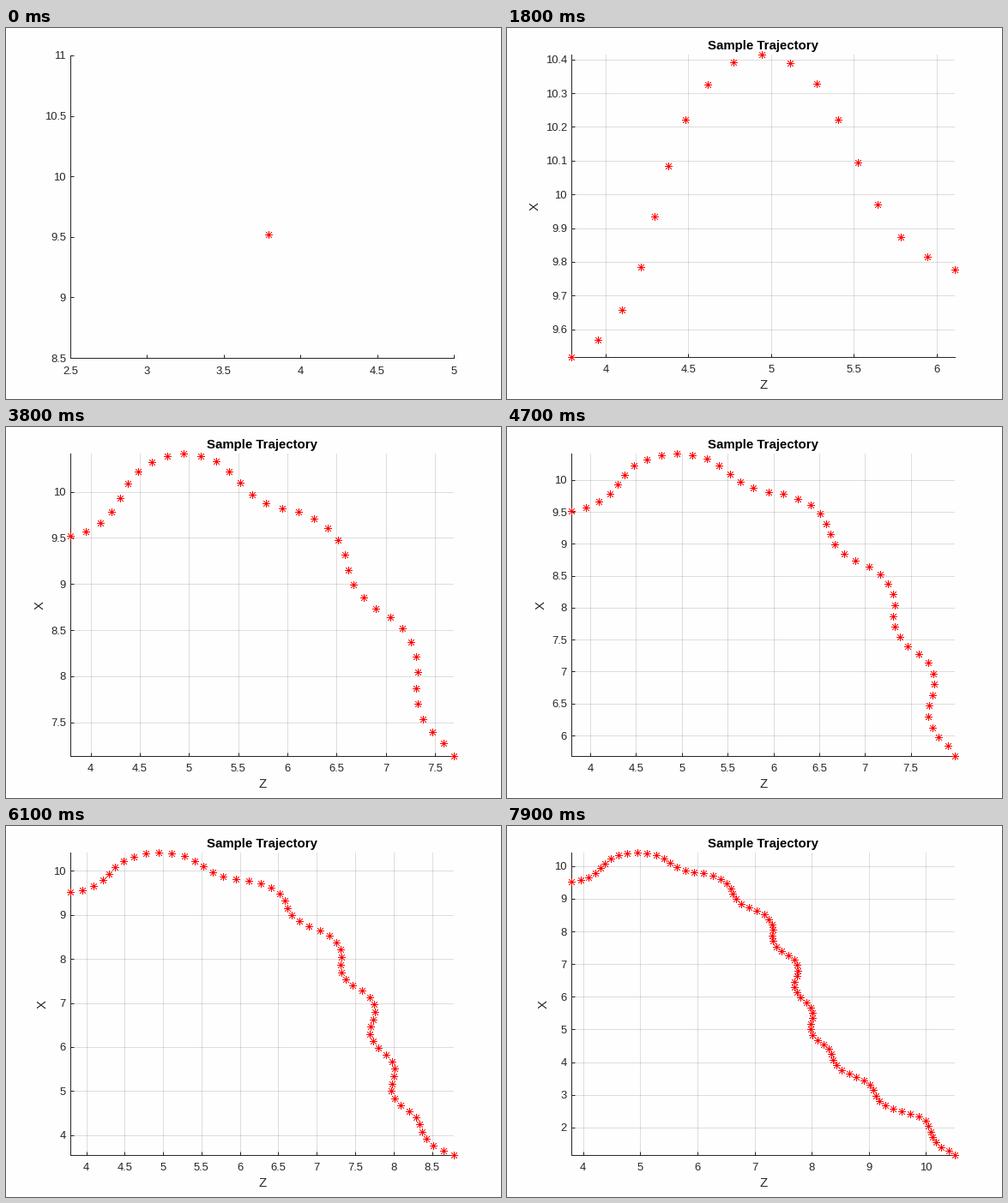
Recreate the animation shown at these times as a matplotlib script. Size 577 px wide and 433 px high, loop 8000 ms.

```python
import math

import matplotlib.pyplot as plt
import numpy as np
from matplotlib.animation import FuncAnimation
from matplotlib.markers import MarkerStyle

W, H = 577, 433
FRAMES, INTERVAL = 80, 100
PAUSE = 23                      # this frame adds no sample
LEFT, RIGHT = 75, 522           # plot box in pixels
INK = (0.15, 0.15, 0.15)
TICK_SIZE, LABEL_SIZE = 13, 15

# The path moves at constant speed; only its heading (degrees) varies.
START = 3.7933 + 9.518j
STEP = 0.1712
HEADINGS = [
    17.5, 32, 47.5, 60, 62.5, 52.5, 37.5, 22.5, 8, -8.5, -21,
    -38.5, -48, -46, -34.5, -20, -12.5, -23.5, -36, -51.5, -67,
    -76.5, -72, -54.5, -43, -32, -44.5, -59.5, -71.5, -84.5, -95,
    -85, -71.5, -57, -45, -54, -72.5, -85.5, -97.5, -102, -92,
    -76, -65, -54, -64.5, -78.5, -93.5, -99, -91, -76, -62,
    -51.5, -56.5, -75, -80, -71, -57.5, -40, -38.5, -40, -52.5,
    -69, -77, -68.5, -50, -40, -28, -25.5, -31, -50, -70.5,
    -78.5, -79, -69, -55.5, -44, -49,
]


def make_path():
    moves = STEP * np.exp(1j * np.radians(HEADINGS))
    moves[0] *= 0.972           # slightly slower start
    path = START + np.concatenate(([0], np.cumsum(moves)))
    return path.real, path.imag


def tick_step(span):
    return next(m * 10.0 ** e for e in range(-4, 3) for m in (1, 2, 5)
                if span / (m * 10.0 ** e) <= 11)


def make_ticks(lo, hi):
    step = tick_step(hi - lo)
    first = math.ceil(lo / step - 1e-6)
    last = math.floor(hi / step + 1e-6)
    values = np.arange(first, last + 1) * step
    return values, [f"{round(v, 6):g}" for v in values]


def tight(values):
    lo, hi = values.min(), values.max()
    return (lo, hi) if hi > lo else (lo - 1, hi + 1)


def text_width(label):
    dots = label.count(".")
    return TICK_SIZE * (0.556 * (len(label) - dots) + 0.278 * dots)


def set_box(top, bottom):
    ax.set_position([LEFT / W, 1 - bottom / H,
                     (RIGHT - LEFT) / W, (bottom - top) / H])


def put_text(x, y, text, **style):
    return fig.text(x / W, 1 - y / H, text, ha="center", va="baseline",
                    fontsize=LABEL_SIZE, **style)


plt.rcParams["font.family"] = "Liberation Sans"
fig = plt.figure(figsize=(W / 72, H / 72), dpi=72, facecolor="#fefefe")
ax = fig.add_axes([0, 0, 1, 1], facecolor="none")
ax.set_axisbelow(True)
for side in ("top", "right"):
    ax.spines[side].set_visible(False)
for side in ("left", "bottom"):
    ax.spines[side].set(linewidth=1, color=INK)
ax.tick_params(direction="in", length=4, width=1, color=INK,
               labelcolor=INK, labelsize=TICK_SIZE)
ax.tick_params(axis="x", pad=9.5)
ax.tick_params(axis="y", pad=5)

xs, ys = make_path()
# An asterisk is an upright cross over a diagonal one.
stars = [
    ax.plot([], [], ls="none", color="red", ms=size, mew=1, clip_on=False,
            marker=MarkerStyle(shape, capstyle="projecting"),
            antialiased=False, zorder=5)[0]
    for shape, size in (("+", 8), ("x", 6))
]

title = put_text(299, 25, "Sample Trajectory", weight="bold", color="black")
xlabel = put_text(299, 421, "Z", color=INK)
ylabel = put_text(36, 208, "X", color=INK, rotation=90,
                  rotation_mode="anchor")


def draw(n):
    count = max(1, n if n < PAUSE else n - 1)
    px, py = xs[:count], ys[:count]
    for star in stars:
        star.set_data(px, py)

    labelled = n > 0
    if labelled:
        xlim, ylim = tight(px), tight(py)
        set_box(31, 384)
    else:
        xlim, ylim = (2.5, 5), (8.5, 11)
        set_box(32, 385)

    xticks, xnames = make_ticks(*xlim)
    yticks, ynames = make_ticks(*ylim)
    ax.set_xticks(xticks, xnames)
    ax.set_yticks(yticks, ynames, va="center_baseline")
    ax.set_xlim(xlim)
    ax.set_ylim(ylim)
    if labelled:
        ax.grid(True, color=INK, alpha=0.15, linewidth=1)
    else:
        ax.grid(False)

    ylabel.set_x((61.5 - max(map(text_width, ynames))) / W)
    for text in (title, xlabel, ylabel):
        text.set_visible(labelled)
    return [*stars, title, xlabel, ylabel]


anim = FuncAnimation(fig, draw, frames=FRAMES, interval=INTERVAL,
                     init_func=lambda: draw(0), repeat=True, repeat_delay=0)
plt.show()
```
